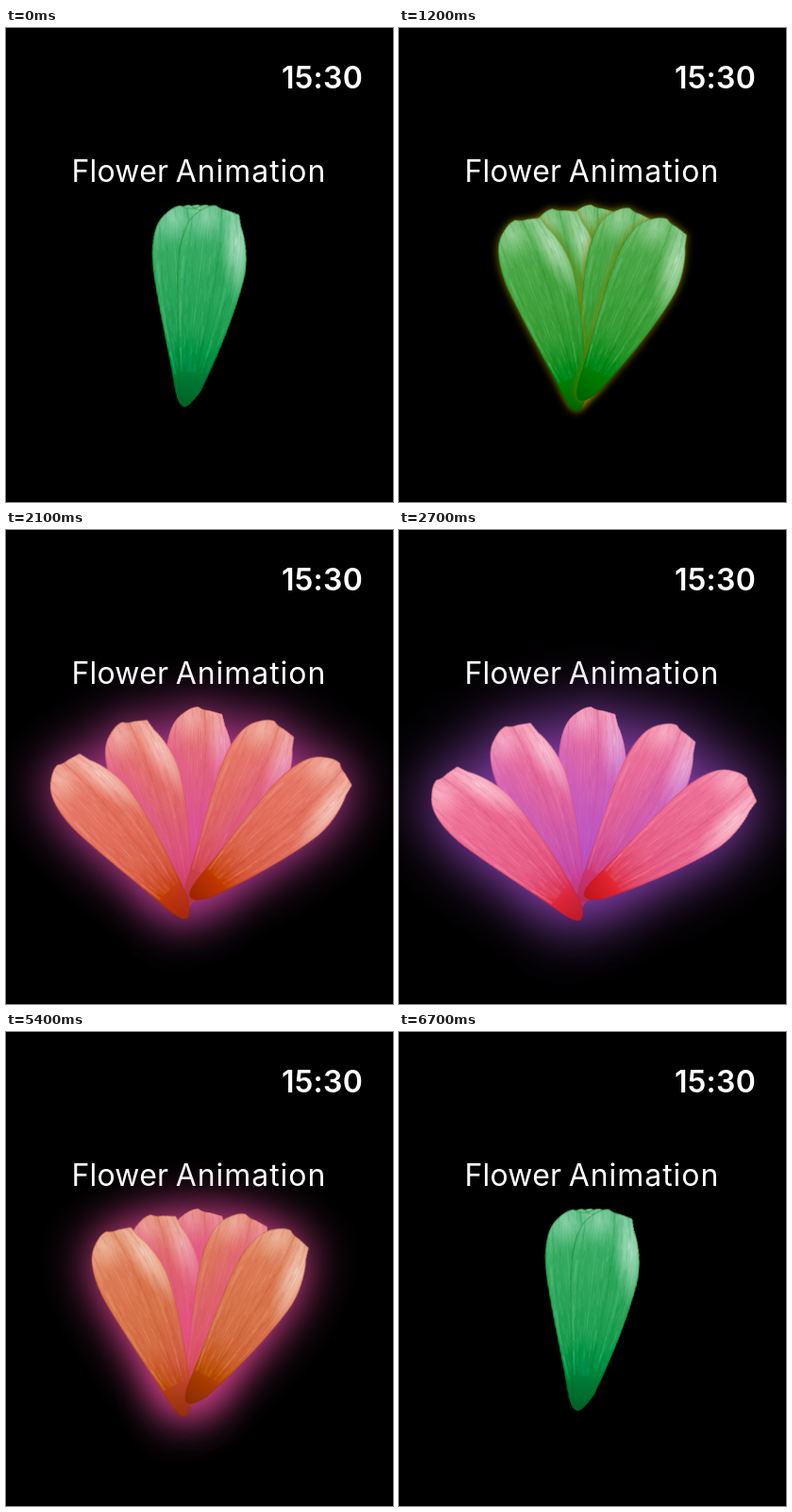
An HTML page that plays this animation: 410 px wide and 502 px high, repeating every 6800 ms.

```html
<!DOCTYPE html>
<html lang="en">
<head>
<meta charset="utf-8">
<title>Flower Animation</title>
<style>
  html, body { margin: 0; width: 100%; height: 100%; overflow: hidden; background: #000; }
  svg { display: block; width: 410px; height: 502px; }
  text { font-family: Inter, "Open Sans", sans-serif; font-size: 32px; fill: #fff; }
  .clock { font-weight: 600; letter-spacing: .25px; text-anchor: end; }
  .tight { letter-spacing: .2px; }
  .loose { letter-spacing: .95px; }
  #flower { --open: 0; --tint: 0; }
  #flower use {
    transform-origin: 205px 402px;
    transform: rotate(calc(var(--side) * (var(--from) + var(--open) * (var(--to) - var(--from))) * 1deg));
    filter: drop-shadow(0 0 calc(var(--tint) * 34px) #af52de)
            hue-rotate(calc((1 - var(--tint)) * 160deg));
  }
  .mid { --side: 0; --from: 0; --to: 0; }
  .inner { --from: 2.5; --to: 25; }
  .outer { --from: 5; --to: 50; }
  .left { --side: -1; }
  .right { --side: 1; }
</style>
</head>
<body>
<svg viewBox="0 0 410 502">
  <defs>
    <linearGradient id="body" gradientUnits="userSpaceOnUse" x1="212" y1="187" x2="190" y2="400">
      <stop offset="0" stop-color="#f58fab"/>
      <stop offset=".25" stop-color="#ee6f97"/>
      <stop offset=".6" stop-color="#e85f88"/>
      <stop offset=".74" stop-color="#e54a6e"/>
      <stop offset=".86" stop-color="#e0222e"/>
      <stop offset="1" stop-color="#bc141a"/>
    </linearGradient>
    <radialGradient id="shine">
      <stop offset="0" stop-color="#ffdbe3" stop-opacity=".85"/>
      <stop offset=".5" stop-color="#ffd0dc" stop-opacity=".45"/>
      <stop offset="1" stop-color="#ffc8d6" stop-opacity="0"/>
    </radialGradient>
    <path id="edge" d="M189 399.5 C185 399 182 391 181 380 C179 350 172 300 169.5 262
      C167.5 238 170.5 218 177 206 C181 198 190 191 198 188 L203.5 187 Q209 191 215 191
      L229 195 L232 207 C239 222 243 245 240 262 C234 300 219 348 205 384 C199 394 194 400 189 399.5Z"/>
    <clipPath id="clip"><use href="#edge"/></clipPath>
    <g id="petal">
      <use href="#edge" fill="url(#body)"/>
      <g clip-path="url(#clip)">
        <ellipse cx="230" cy="228" rx="18" ry="64" fill="url(#shine)" transform="rotate(-6 230 228)"/>
        <ellipse cx="194" cy="200" rx="26" ry="26" fill="url(#shine)" opacity=".5"/>
        <g id="veins" fill="none"></g>
        <use href="#edge" fill="none" stroke="#8c1238" stroke-opacity=".3" stroke-width="1.2"/>
      </g>
    </g>
  </defs>
  <text class="clock" x="378" y="64">15:30</text>
  <text y="163"><tspan class="tight" x="69.5">Flower </tspan><tspan class="loose" x="179.7">Animation</tspan></text>
  <g id="flower">
    <use href="#petal" class="mid"/>
    <use href="#petal" class="inner left"/>
    <use href="#petal" class="inner right"/>
    <use href="#petal" class="outer left"/>
    <use href="#petal" class="outer right"/>
  </g>
</svg>
<script>
  const LOOP = 6800, STEP = 100, MOVE = 2000, OPEN_AT = 700, CLOSE_AT = 4700;
  const flower = document.getElementById('flower');

  // Fine streaks fanning out from the base of the petal
  let seed = 7;
  const rand = () => (seed = seed * 16807 % 2147483647) / 2147483647;
  let veins = '';
  for (let i = 0; i < 90; i++) {
    const u = rand(), light = rand() < .5;
    const d = `M${181 + 28 * u} 365C${174 + 47 * u} 325 ${163 + 84 * u} 260 ${175 + 56 * u} 187`;
    veins += `<path d="${d}" stroke="${light ? '#ffc4d4' : '#b83060'}"
      stroke-opacity="${.05 + .15 * rand()}" stroke-width="${.5 + .6 * rand()}"
      stroke-dasharray="${8 + 30 * rand()} ${5 + 25 * rand()}" stroke-dashoffset="${60 * rand()}"/>`;
  }
  document.getElementById('veins').innerHTML = veins;

  // Cubic Bezier easing with handles (x1, 0) and (.58, 1)
  function ease(x, x1) {
    if (x <= 0) return 0;
    if (x >= 1) return 1;
    let lo = 0, hi = 1;
    for (let i = 0; i < 24; i++) {
      const s = (lo + hi) / 2, r = 1 - s;
      if (3 * r * r * s * x1 + 3 * r * s * s * .58 + s * s * s < x) lo = s; else hi = s;
    }
    return lo * lo * (3 - 2 * lo);
  }

  const level = (t, x1) => ease((t - OPEN_AT) / MOVE, x1) - ease((t - CLOSE_AT) / MOVE, x1);

  const start = performance.now();
  let last = -1;
  function draw() {
    const t = Math.floor((performance.now() - start) % LOOP / STEP) * STEP;
    if (t !== last) {
      last = t;
      flower.style.setProperty('--open', level(t, 0).toFixed(4));
      flower.style.setProperty('--tint', level(t, .42).toFixed(4));
    }
    requestAnimationFrame(draw);
  }
  draw();
</script>
</body>
</html>
```
